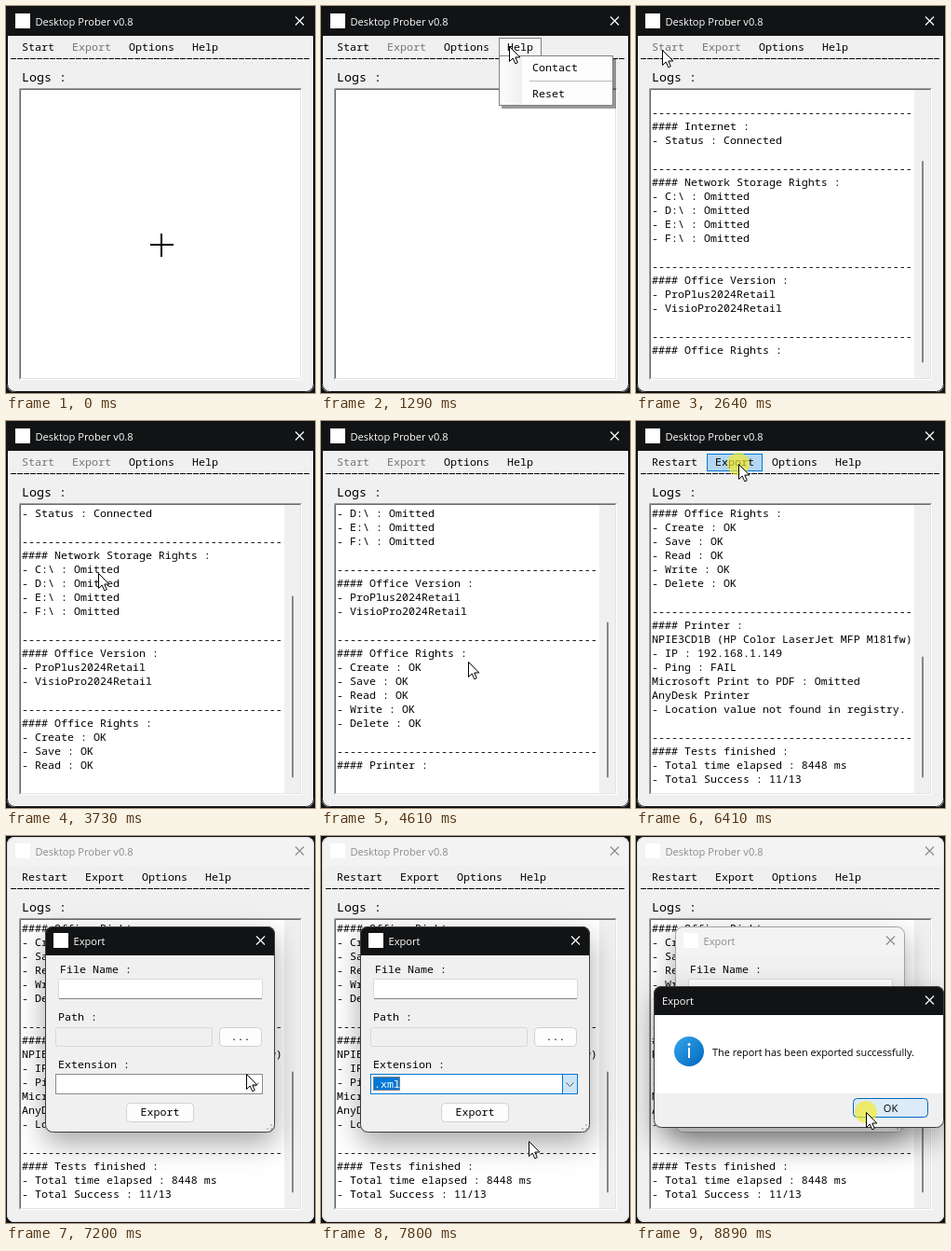
An HTML page for the animation above (8990 ms loop, 332 by 415 pixels).

```html
<!DOCTYPE html>
<html lang="en">
<head>
<meta charset="utf-8">
<title>Desktop Prober</title>
<style>
html, body { margin: 0; width: 100%; height: 100%; overflow: hidden; background: #101113; }
svg { display: block; width: 332px; height: 415px; }
.mono { font: 500 11.67px "Noto Sans Mono", "DejaVu Sans Mono", monospace; }
.ui { font: 11.1px "Open Sans", "Noto Sans", sans-serif; }
.dialog { filter: drop-shadow(0 12px 15px rgba(0, 0, 0, .34)); }
</style>
</head>
<body>
<svg id="stage" viewBox="0 0 332 415"></svg>
<script>
const LOOP = 8990;
const STEP = 99; // ms between two visible pointer positions
const DARK = '#111315';
const BLUE = '#0078d7';

// Where the pointer goes, when it leaves and arrives, and whether it clicks there.
const stop = (from, to, x, y, click = false) => ({ from, to, x, y, click });
const STOPS = {
  centre: stop(0, 0, 167, 250),
  help: stop(390, 890, 202, 43, true),
  options: stop(1290, 1480, 148, 46),
  start: stop(1940, 2240, 28, 47, true),
  log: stop(2940, 4410, 158, 258),
  drift: stop(4910, 4910, 147, 247),
  away: stop(5420, 5420, 252, 268),
  report: stop(5620, 6410, 110, 46, true),
  combo: stop(6610, 7300, 267, 267, true),
  choice: stop(7400, 7700, 223, 327, true),
  confirm: stop(7800, 8100, 172, 297, true),
  aside: stop(8200, 8490, 199, 298),
  ok: stop(8590, 8890, 247, 296, true)
};

const RULE = '-'.repeat(40);
const section = (title, ...lines) => [RULE, `#### ${title} :`, ...lines, ''];
const block = (from, to, lines) => ({ from, to, lines });
const BLOCKS = [
  block(STOPS.start.to, 2640, [
    ...section('Tests started', '- Version : 0.8'),
    ...section('Session', '- Status : Opened'),
    ...section('Internet', '- Status : Connected'),
    ...section('Network Storage Rights', ...[...'CDEF'].map(d => `- ${d}:\\ : Omitted`)),
    ...section('Office Version', '- ProPlus2024Retail', '- VisioPro2024Retail'),
    RULE, '#### Office Rights :'
  ]),
  block(2640, 4410, ['Create', 'Save', 'Read', 'Write', 'Delete'].map(a => `- ${a} : OK`)),
  block(4610, 4610, ['', RULE, '#### Printer :']),
  block(4910, 4910, [
    'NPIE3CD1B (HP Color LaserJet MFP M181fw)', '- IP : 192.168.1.149', '- Ping : FAIL',
    'Microsoft Print to PDF : Omitted', 'AnyDesk Printer',
    '- Location value not found in registry.', '',
    RULE, '#### Tests finished :', '- Total time elapsed : 8448 ms', '- Total Success : 11/13'
  ])
];
const DONE = BLOCKS[BLOCKS.length - 1].to;

const rect = (x, y, w, h, fill, extra = '') =>
  `<rect x="${x}" y="${y}" width="${w}" height="${h}" fill="${fill}" ${extra}/>`;
const box = (x, y, w, h, fill, stroke, r = 0) =>
  rect(x + .5, y + .5, w - 1, h - 1, fill, `stroke="${stroke}" rx="${r}"`);
const line = (d, stroke, extra = '') => `<path d="${d}" fill="none" stroke="${stroke}" ${extra}/>`;
const text = (x, y, s, cls = 'mono', fill = '#000', extra = '') =>
  `<text x="${x}" y="${y}" class="${cls}" fill="${fill}" ${extra}>${s}</text>`;

const within = (t, from, to) => t >= from && t < to;
const inside = (p, x, y, w, h) => within(p.x, x, x + w) && within(p.y, y, y + h);
const smooth = k => k * k * (3 - 2 * k);

// Progress from 0 to 1 in visible steps.
function stepped(t, { from, to }) {
  if (t >= to) return 1;
  const n = Math.max(1, Math.round((to - from) / STEP));
  return Math.max(0, Math.floor((t - from) / (to - from) * n + .05) / n);
}

function pointerAt(t) {
  const p = { x: 0, y: 0 };
  for (const s of Object.values(STOPS)) {
    if (t < s.from) break;
    const k = smooth(stepped(t, s));
    p.x = Math.round(p.x + (s.x - p.x) * k);
    p.y = Math.round(p.y + (s.y - p.y) * k);
  }
  return p;
}

function frame(x, y, w, h, title, active, icon, border) {
  const ink = active ? '#fff' : '#8c8c8c';
  const cx = x + w - 15.5, cy = y + 15;
  return rect(x, y, w, h, active ? DARK : '#f3f3f3', 'rx="8"') +
    `<path d="M${x} ${y + 31}h${w}v${h - 39}a8 8 0 0 1-8 8h${16 - w}a8 8 0 0 1-8-8z" fill="#f0f0f0"/>` +
    box(x, y, w, h, 'none', border, 8) +
    (icon ? rect(x + 9, y + 7, 16, 16, '#fff') : '') +
    text(x + (icon ? 30.5 : 9), y + 19.5, title, 'ui', ink) +
    line(`M${cx - 4.5} ${cy - 4.5}l9 9m0-9l-9 9`, ink, 'stroke-width="1.2"');
}

function dropdown(x, w, items) {
  const h = 4 + items.reduce((sum, s) => sum + (s ? 22 : 6), 0);
  let y = 55, out = rect(x + 3, 56, w, h, '#000', 'opacity=".4"') +
    box(x, 53, w, h, '#fdfdfd', '#808080') + rect(x + 1, 54, 24, h - 2, 'url(#margin)');
  for (const s of items) {
    out += s ? text(x + 36, y + 14.5, s) : line(`M${x + 33} ${y + 3.5}H${x + w - 1}`, '#bdbdbd');
    y += s ? 22 : 6;
  }
  return out;
}

function menu(t, p) {
  const done = t >= DONE;
  const running = within(t, STOPS.start.to + 100, DONE);
  const browsing = within(t, STOPS.help.to, STOPS.start.to);
  const lists = {
    Help: x => dropdown(x, 123, ['Contact', '', 'Reset']),
    Options: x => dropdown(x, 140, ['Internet', 'Storage', 'Office', 'Printer', '', 'Settings'])
  };
  let x = 8, list = '';
  let out = line('M5 56.5H327', '#000', 'stroke-dasharray="6 1"');
  for (const label of [done ? 'Restart' : 'Start', 'Export', 'Options', 'Help']) {
    const w = label.length * 7 + 19;
    const off = label === 'Export' && !done || label === 'Start' && running;
    const hover = !off && t < STOPS.report.to + 100 && inside(p, x, 34, w, 21);
    if (hover && browsing && lists[label]) {
      out += box(x, 34, w - 1, 21, '#f8f8f8', '#808080');
      list = lists[label](x);
    } else if (hover) {
      out += box(x, 35, w - 1, 19, '#b3d7f3', BLUE);
    }
    out += text(x + 9, 48, label, 'mono', off ? '#77746d' : '#000');
    x += w;
  }
  return [out, list];
}

function log(t) {
  const lines = BLOCKS.flatMap(b => b.lines.slice(0, Math.floor(b.lines.length * stepped(t, b) + .01)));
  if (lines.length && t < DONE) lines.push('');
  const top = Math.max(0, lines.length - 20);
  let out = rect(14, 88, 304, 313, '#fff') +
    line('M14.5 400.5V88.5H317.5', '#a0a0a0') + line('M15.5 399.5V89.5H316.5', '#696969') +
    line('M15.5 399.5H316.5V90', '#e3e3e3');
  if (top) {
    const h = 288 * 20.3 / lines.length;
    out += rect(299, 90, 17, 309, '#f0f0f0') + rect(307, 382.5 - h, 2, h, '#868686', 'rx="1"');
  }
  lines.slice(top).forEach((s, i) => { out += text(17, 103 + 15 * i, s); });
  return out;
}

function exportDialog(t, p) {
  const active = t < STOPS.confirm.to + 100;
  const focused = t >= STOPS.combo.to;
  const picked = t >= STOPS.choice.to + 100;
  const button = (x, y, w, s) =>
    box(x, y, w, 21, '#fdfdfd', active && inside(p, x, y, w, 21) ? BLUE : '#d0d0d0', 4) +
    text(x + w / 2, y + 14, s, 'mono', '#000', 'text-anchor="middle"');
  let out = frame(42, 97, 247, 221, 'Export', active, true, active ? '#3c3c3c' : '#a2a2a2') +
    text(58, 147, 'File Name :') + text(56, 198, 'Path :') + text(56, 249, 'Extension :') +
    box(56, 153, 220, 22, '#fff', '#d9d9d9', 2) + rect(57, 174, 218, 1, '#858585') +
    box(53, 205, 169, 21, '#f0f0f0', '#d8d8d8', 2) +
    button(229, 205, 46, '...') + button(129, 286, 73, 'Export') +
    box(53, 255, 223, 22, '#fff', focused ? BLUE : '#8a8a8a') +
    (focused ? box(259, 255, 17, 22, '#cce4f7', BLUE) : '') +
    line('M263.5 264.5l4 4 4-4', '#555') +
    line('M280 314h6m-2-4h2', '#bfbfbf', 'stroke-width="2" stroke-dasharray="2 2"');
  if (picked) {
    out += rect(56, 258, 29, 15, BLUE) +
      line('M56.5 258.5h28v14h-28z', '#ff8728', 'stroke-dasharray="1 1"') +
      text(57, 269.5, '.xml', 'mono', '#fff');
  } else if (t >= STOPS.choice.from) {
    const current = Math.max(0, Math.min(3, Math.floor((p.y - 278) / 15)));
    out += box(53, 277, 223, 62, '#fff', '#666');
    ['.csv', '.html', '.txt', '.xml'].forEach((s, i) => {
      const y = 278 + 15 * i, on = i === current;
      out += (on ? rect(54, y, 221, 15, BLUE) : '') + text(57, y + 11.5, s, 'mono', on ? '#fff' : '#000');
    });
  }
  return out;
}

function message(t, p) {
  const hover = inside(p, 233, 281, 81, 21);
  return frame(19, 161, 312, 152, 'Export', true, false, '#3c3c3c') +
    rect(20, 192, 310, 84, '#fff') +
    '<circle cx="57" cy="231" r="16" fill="url(#info)"/>' +
    rect(56, 227, 2, 11, '#fff') + '<circle cx="57" cy="223.5" r="1.5" fill="#fff"/>' +
    text(82, 235.5, 'The report has been exported successfully.', 'ui', '#000', 'style="font-size:10.9px"') +
    box(233, 281, 81, 21, hover ? '#dcebf8' : '#fdfdfd', '#0067c0', 4) +
    text(273.5, 295.5, 'OK', 'ui', '#000', 'text-anchor="middle"');
}

// A dialog opens after a click, growing and fading in during its first step.
function popup(t, p, { to }, cx, cy, body) {
  const age = t - to - 100;
  if (age < 0) return '';
  const opening = age < STEP;
  const move = `translate(${cx} ${cy}) scale(${opening ? .95 : 1}) translate(${-cx} ${-cy})`;
  return `<g class="dialog" opacity="${opening ? .6 : 1}" transform="${move}">${body(t, p)}</g>`;
}

function pointer(t, { x, y }) {
  if (t < STOPS.help.from) return rect(155, 255, 25, 2, '#000') + rect(166, 244, 2, 25, '#000');
  const clicked = Object.values(STOPS).some(s => s.click && within(t, s.to, s.to + 100));
  return (clicked ? `<circle cx="${x}" cy="${y}" r="12" fill="#f3ea28" opacity=".68"/>` : '') +
    `<path transform="translate(${x + .5} ${y + .5})" d="M0 0V16L3.7 12.5 6.3 18.3 8.8 17.2 6.3 11.5H11.3Z"
      fill="#fff" stroke="#000"/>`;
}

const DEFS = `<defs>
  <linearGradient id="margin"><stop stop-color="#fcfcfc"/><stop offset="1" stop-color="#f0f0f0"/></linearGradient>
  <linearGradient id="info" x2="1" y2="1"><stop stop-color="#35a5ec"/><stop offset="1" stop-color="#0067bd"/></linearGradient>
</defs>`;

function scene(t) {
  const p = pointerAt(t);
  const [strip, list] = menu(t, p);
  const active = t < STOPS.report.to + 100;
  return DEFS + rect(0, 0, 332, 415, '#101113') +
    frame(1, 1, 330, 413, 'Desktop Prober v0.8', active, true, active ? DARK : '#dedede') +
    strip + text(17, 81, 'Logs :', 'mono', '#000', 'style="font-size:13.33px"') + log(t) + list +
    popup(t, p, STOPS.report, 166, 207, exportDialog) +
    popup(t, p, STOPS.confirm, 175, 237, message) +
    pointer(t, p);
}

const stage = document.getElementById('stage');
const began = performance.now();
let shown = '';

function draw() {
  const markup = scene((performance.now() - began + 1) % LOOP);
  if (markup !== shown) stage.innerHTML = shown = markup;
  requestAnimationFrame(draw);
}
draw();
</script>
</body>
</html>
```
